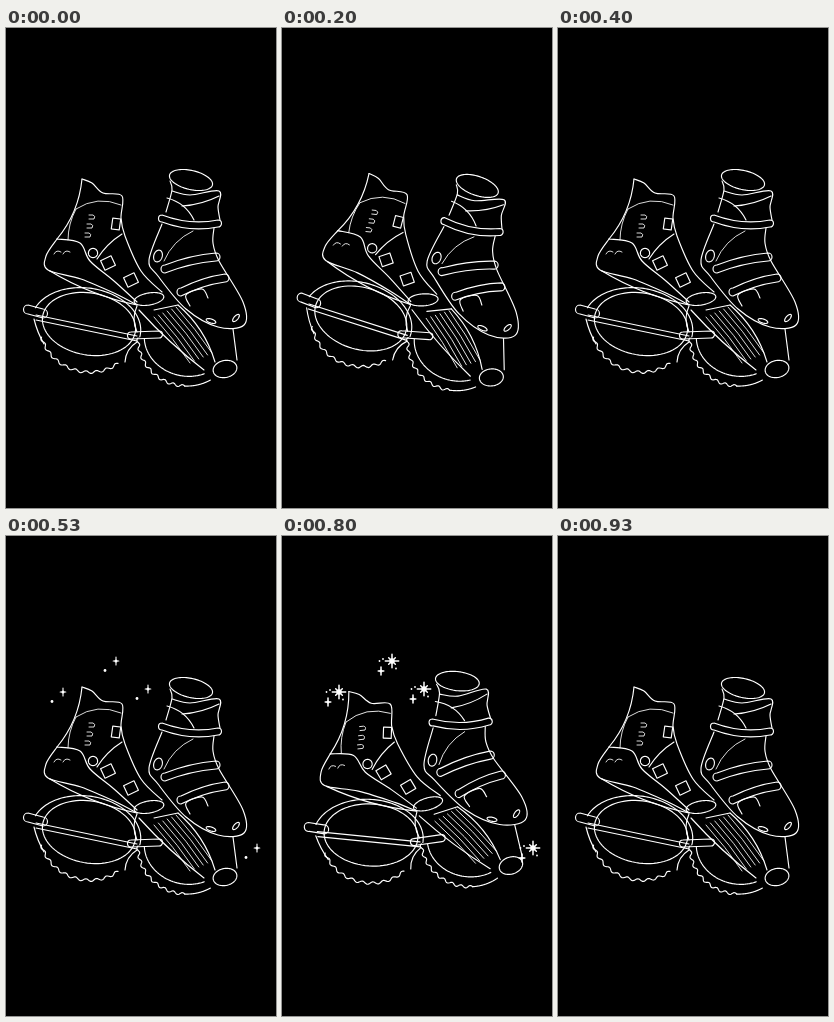
An HTML page for the animation above (990 ms loop, 270 by 480 pixels).

```html
<!DOCTYPE html>
<html lang="en">
<head>
<meta charset="utf-8">
<title>Rocking boots</title>
<style>
html, body { margin: 0; width: 100%; height: 100%; overflow: hidden; background: #000; }
svg { display: block; width: 100vw; height: 100vh; background: #000; }
#boots { fill: none; stroke: #fff; stroke-width: 1.15; stroke-linecap: round; stroke-linejoin: round; }
#boots .thin { stroke-width: .85; }
#sparks { fill: #fff; stroke: #fff; stroke-linecap: round; }
</style>
</head>
<body>
<svg viewBox="0 0 270 480" preserveAspectRatio="none">
  <g id="boots"></g>
  <g id="sparks"></g>
</svg>
<script>
const LOOP = 990;
const boots = document.getElementById('boots');
const sparks = document.getElementById('sparks');
const rad = deg => deg * Math.PI / 180;
const fix = v => +v.toFixed(2);

function add(d, cls = '') {
  boots.insertAdjacentHTML('beforeend', `<path class="${cls}" d="${d}"/>`);
}

// Smooth line through a few key points.
function curve(s) {
  const p = s.split(' ').map(q => q.split(',').map(Number));
  const at = i => p[Math.max(0, Math.min(p.length - 1, i))];
  let d = 'M' + p[0];
  for (let i = 0; i < p.length - 1; i++) {
    const [a, b, c, e] = [at(i - 1), at(i), at(i + 1), at(i + 2)];
    const c1 = b.map((v, k) => fix(v + (c[k] - a[k]) / 6));
    const c2 = c.map((v, k) => fix(v - (e[k] - b[k]) / 6));
    d += `C${c1} ${c2} ${c}`;
  }
  add(d);
}

// Line from one point to another, bent sideways by h.
function bow(x1, y1, x2, y2, h = 0, cls) {
  const k = 2 * h / Math.hypot(x2 - x1, y2 - y1);
  const cx = (x1 + x2) / 2 - (y2 - y1) * k, cy = (y1 + y2) / 2 + (x2 - x1) * k;
  add(`M${x1} ${y1}Q${fix(cx)} ${fix(cy)} ${x2} ${y2}`, cls);
}

// Sagging band of width w with round ends.
function strap(x1, y1, x2, y2, sag, w) {
  const cx = (x1 + x2) / 2, cy = (y1 + y2) / 2 + 2 * sag, cap = `A${w / 2} ${w / 2} 0 0 1 `;
  add(`M${x1} ${y1}Q${cx} ${cy} ${x2} ${y2}${cap}${x2} ${y2 + w}Q${cx} ${cy + w} ${x1} ${y1 + w}${cap}${x1} ${y1}`);
}

// Part of a tilted ellipse; waves > 0 makes a tread.
function arc(cx, cy, rx, ry, tilt, from, to, waves = 0) {
  const n = 80, c = Math.cos(rad(tilt)), s = Math.sin(rad(tilt));
  let d = '';
  for (let i = 0; i <= n; i++) {
    const a = rad(from + (to - from) * i / n);
    const grow = waves ? 1.3 * Math.sin(2 * Math.PI * waves * i / n) : 0;
    const x = (rx + grow) * Math.cos(a), y = (ry + grow) * Math.sin(a);
    d += `${i ? 'L' : 'M'}${fix(cx + x * c - y * s)} ${fix(cy + x * s + y * c)}`;
  }
  add(d);
}
const oval = (x, y, rx, ry, turn = 0) => arc(x, y, rx, ry, turn, 0, 360);

function box(x, y, w, h, turn) {
  boots.insertAdjacentHTML('beforeend',
    `<rect x="${-w / 2}" y="${-h / 2}" width="${w}" height="${h}" transform="translate(${x} ${y}) rotate(${turn})"/>`);
}

function leftShell() {
  arc(80, 298, 55, 38, 8, -163, 5);
  oval(83, 296, 47, 31, 10);
  arc(82, 300, 48, 44, 12, 155, 40, 9);
  bow(28, 291, 38, 316, 1);
  bow(119, 334, 131, 314, -3);
  strap(22, 277, 37, 281, 0, 9);
  for (const k of [0, 5]) bow(30, 287 + k, 131, 308 + k);
}

function rightShell() {
  arc(180, 312, 48, 46, 12, 170, 80, 8);
  arc(180, 312, 48, 46, 12, 80, 48);
  arc(180, 312, 42, 36, 14, 165, 52);
  strap(125, 304, 153, 303, 0, 7);
  oval(143, 271, 15, 6, -10);
  bow(131, 278, 131, 304, 3);
  bow(133, 282, 198, 342, 2);
  bow(148, 282, 172, 277);
  bow(172, 277, 209, 334, -5);
  for (let i = 0; i < 6; i++) {
    const x = 148 + i * 4.4, y = 289 - i * 2;
    bow(x, y, x + 36, y + 46, -1, 'thin');
  }
  bow(227, 301, 231, 332);
  oval(219, 341, 12, 8.5, -12);
}

function leftBoot() {
  curve('76,151 86,155 97,165 116,168 115,190 119,208 135,243 156,264');
  bow(76, 151, 51, 211, -5);
  curve('51,211 40,228 42,242 75,251 110,266 131,277');
  curve('51,211 74,215 84,233 108,253 131,274');
  bow(116, 206, 91, 231, 2);
  bow(44, 243, 131, 277, 4);
  bow(70, 181, 115, 177, -6, 'thin');
  bow(70, 181, 62, 212, 2, 'thin');
  for (let i = 0; i < 3; i++) add(`M${83 - 2 * i} ${187 + 9 * i}h4q3 1 1 4h-5`, 'thin');
  for (let i = 0; i < 2; i++) {
    bow(48 + 9 * i, 226, 55 + 9 * i, 224, -2, 'thin');
    box(102 + 23 * i, 235 + 17 * i, 11.5, 10.5, -25);
  }
  box(110, 196, 8, 11, 8);
  oval(87, 225, 4.6, 4.6);
}

function rightBoot() {
  oval(185, 152, 22, 9.5, 13);
  curve('164,153 166,162 160,184');
  curve('166,163 184,167 213,163 212,179 214,192');
  bow(213, 168, 176, 178, -2);
  bow(161, 170, 188, 192, -4);
  strap(156, 187, 212, 192, 4, 7);
  curve('156,196 143,232 152,248 180,281 212,299 238,297 237,274 213,233 207,215 208,200');
  bow(187, 203, 158, 233, 4, 'thin');
  strap(159, 237, 210, 225, -2, 8);
  strap(175, 260, 219, 246, -2, 8);
  curve('184,278 180,267 196,261 202,270');
  oval(152, 228, 4.2, 6, 18);
  oval(205, 293, 5, 2, 18);
  oval(230, 290, 4.5, 2, -48);
}

leftShell();
rightShell();
leftBoot();
rightBoot();

function rays(x, y, n, r, r2) {
  let d = '';
  for (let i = 0; i < n; i++) {
    const a = i * 2 * Math.PI / n, k = i % 2 ? r2 : r;
    d += `M${x} ${y}l${fix(Math.sin(a) * k)} ${fix(-Math.cos(a) * k)}`;
  }
  return d;
}
const star = (x, y, n, r, w) =>
  `<path d="${rays(x, y, n, r, r * .7)}" stroke-width="${w}"/>` + dot(x, y, r * .4);
const dot = (x, y, r) => `<circle cx="${x}" cy="${y}" r="${r}" stroke="none"/>`;

// A large star with a small one at its lower left; both grow with size 1 to 3.
function cluster([x, y], size) {
  if (size === 1) return star(x, y, 4, 4, 1.1) + dot(x - 11, y + 9.5, 1.4);
  const r = 4.6 + size * .7;
  return star(x, y, 8, r, size / 2) + star(x - 11, y + 10, 4, r - 2.7, size / 2) +
    dot(x - 12.5, y, .9) + dot(x + 4, y + 7.5, .9) + (size === 3 ? dot(x - 9, y - 2, .9) : '');
}
const spots = [[57, 156], [110, 125], [142, 153], [251, 312]];

const rock = ['', 'translate(27.2 -12.6) rotate(6)', 'translate(-24.5 13.3) rotate(-6)', ''];
const beatStart = k => 10 * Math.round(k * 40 / 3);
let shown = -1;

function draw(ms) {
  const t = ms % LOOP;
  let beat = 7;
  while (beatStart(beat) > t) beat--;
  if (beat === shown) return;
  shown = beat;
  const size = beat < 7 ? beat - 3 : 0;
  boots.setAttribute('transform', rock[beat % 4]);
  sparks.innerHTML = size > 0 ? spots.map(p => cluster(p, size)).join('') : '';
}

const start = performance.now();
function tick() {
  draw(performance.now() - start);
  requestAnimationFrame(tick);
}
tick();
</script>
</body>
</html>
```
